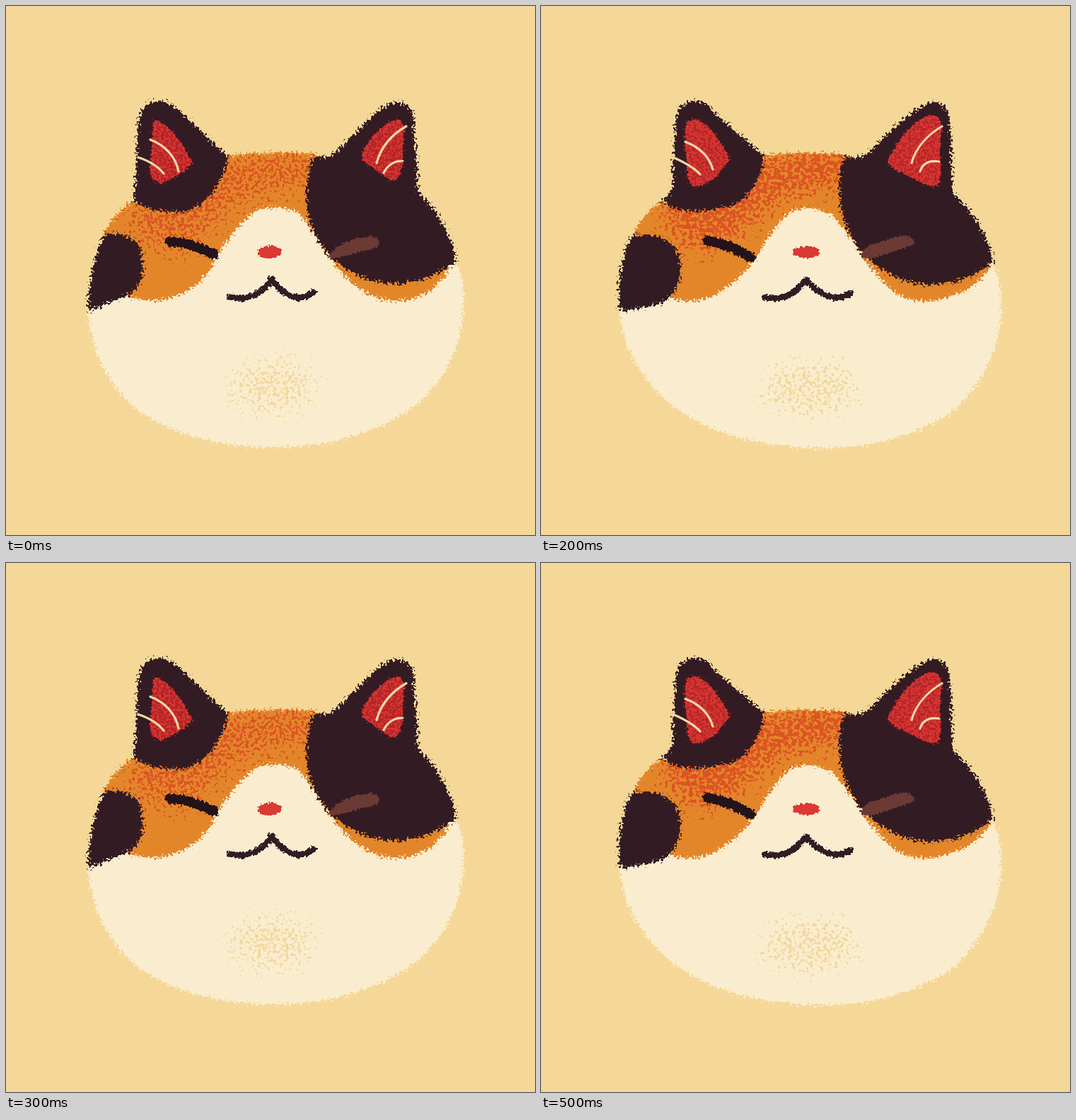
An HTML page without scripts that plays this animation: 748 by 748 pixels, repeating every 0.6 s.

```html
<!DOCTYPE html>
<html lang="en">
<head>
<meta charset="utf-8">
<title>Sleepy calico</title>
<style>
html, body { margin: 0; width: 100%; height: 100%; overflow: hidden; background: #f5d897; }
svg { position: absolute; left: 0; top: 0; width: 100%; height: 100%; }
.pose { opacity: 0; will-change: opacity; animation: show 300ms step-end infinite; }
.b { animation-delay: -200ms; }
.c { animation-delay: -100ms; }
@keyframes show { 0% { opacity: 1; } 33.333% { opacity: 0; } 100% { opacity: 0; } }

.cream { fill: #faedcf; }
.cap { fill: #e3862a; }
.rust { fill: #dc5424; }
.dark { fill: #331b24; }
.ears { fill: #d83530; }
.ears-grain { fill: #b0262a; }
.belly { fill: #f3d79f; fill-opacity: .46; }
.hair { fill: none; stroke: #f6d7a3; stroke-width: 3.2; stroke-linecap: round; }
.eye { fill: none; stroke: #24131a; stroke-width: 14; stroke-linecap: round; }
.lid { fill: #6b3a35; }
.nose { fill: #d93a33; }
.mouth { fill: none; stroke: #331b24; stroke-width: 8.5; stroke-linecap: round; stroke-linejoin: round; }

.a .edge { filter: url(#edgeA); } .a .line { filter: url(#lineA); } .a .grain { filter: url(#grainA); }
.b .edge { filter: url(#edgeB); } .b .line { filter: url(#lineB); } .b .grain { filter: url(#grainB); }
.c .edge { filter: url(#edgeC); } .c .line { filter: url(#lineC); } .c .grain { filter: url(#grainC); }
</style>
</head>
<body>

<!-- Each filter blurs a shape, adds noise and thresholds it, giving a dry-brush edge or speckle. -->
<svg viewBox="0 0 748 748" aria-hidden="true">
  <defs>
    <filter id="edgeA" color-interpolation-filters="sRGB">
      <feTurbulence type="fractalNoise" baseFrequency=".3" numOctaves="2" seed="3"/>
      <feColorMatrix values="0 0 0 0 0 0 0 0 0 0 0 0 0 0 0 0 0 0 2.4 -.7" result="noise"/>
      <feGaussianBlur in="SourceGraphic" stdDeviation="2.8" result="soft"/>
      <feComposite in="noise" in2="soft" operator="arithmetic" k2=".5" k3=".55"/>
      <feColorMatrix values="1 0 0 0 0 0 1 0 0 0 0 0 1 0 0 0 0 0 24 -12" result="mask"/>
      <feColorMatrix in="soft" values="1 0 0 0 0 0 1 0 0 0 0 0 1 0 0 0 0 0 99 0"/>
      <feComposite in2="mask" operator="in"/>
    </filter>
    <filter id="edgeB" color-interpolation-filters="sRGB">
      <feTurbulence type="fractalNoise" baseFrequency=".3" numOctaves="2" seed="14"/>
      <feColorMatrix values="0 0 0 0 0 0 0 0 0 0 0 0 0 0 0 0 0 0 2.4 -.7" result="noise"/>
      <feGaussianBlur in="SourceGraphic" stdDeviation="2.8" result="soft"/>
      <feComposite in="noise" in2="soft" operator="arithmetic" k2=".5" k3=".55"/>
      <feColorMatrix values="1 0 0 0 0 0 1 0 0 0 0 0 1 0 0 0 0 0 24 -12" result="mask"/>
      <feColorMatrix in="soft" values="1 0 0 0 0 0 1 0 0 0 0 0 1 0 0 0 0 0 99 0"/>
      <feComposite in2="mask" operator="in"/>
    </filter>
    <filter id="edgeC" color-interpolation-filters="sRGB">
      <feTurbulence type="fractalNoise" baseFrequency=".3" numOctaves="2" seed="27"/>
      <feColorMatrix values="0 0 0 0 0 0 0 0 0 0 0 0 0 0 0 0 0 0 2.4 -.7" result="noise"/>
      <feGaussianBlur in="SourceGraphic" stdDeviation="2.8" result="soft"/>
      <feComposite in="noise" in2="soft" operator="arithmetic" k2=".5" k3=".55"/>
      <feColorMatrix values="1 0 0 0 0 0 1 0 0 0 0 0 1 0 0 0 0 0 24 -12" result="mask"/>
      <feColorMatrix in="soft" values="1 0 0 0 0 0 1 0 0 0 0 0 1 0 0 0 0 0 99 0"/>
      <feComposite in2="mask" operator="in"/>
    </filter>

    <filter id="lineA" color-interpolation-filters="sRGB" y="-20%" height="140%">
      <feTurbulence type="fractalNoise" baseFrequency=".3" numOctaves="2" seed="5"/>
      <feColorMatrix values="0 0 0 0 0 0 0 0 0 0 0 0 0 0 0 0 0 0 2.4 -.7" result="noise"/>
      <feGaussianBlur in="SourceGraphic" stdDeviation="1.2" result="soft"/>
      <feComposite in="noise" in2="soft" operator="arithmetic" k2=".5" k3=".55"/>
      <feColorMatrix values="1 0 0 0 0 0 1 0 0 0 0 0 1 0 0 0 0 0 24 -12" result="mask"/>
      <feColorMatrix in="soft" values="1 0 0 0 0 0 1 0 0 0 0 0 1 0 0 0 0 0 99 0"/>
      <feComposite in2="mask" operator="in"/>
    </filter>
    <filter id="lineB" color-interpolation-filters="sRGB" y="-20%" height="140%">
      <feTurbulence type="fractalNoise" baseFrequency=".3" numOctaves="2" seed="16"/>
      <feColorMatrix values="0 0 0 0 0 0 0 0 0 0 0 0 0 0 0 0 0 0 2.4 -.7" result="noise"/>
      <feGaussianBlur in="SourceGraphic" stdDeviation="1.2" result="soft"/>
      <feComposite in="noise" in2="soft" operator="arithmetic" k2=".5" k3=".55"/>
      <feColorMatrix values="1 0 0 0 0 0 1 0 0 0 0 0 1 0 0 0 0 0 24 -12" result="mask"/>
      <feColorMatrix in="soft" values="1 0 0 0 0 0 1 0 0 0 0 0 1 0 0 0 0 0 99 0"/>
      <feComposite in2="mask" operator="in"/>
    </filter>
    <filter id="lineC" color-interpolation-filters="sRGB" y="-20%" height="140%">
      <feTurbulence type="fractalNoise" baseFrequency=".3" numOctaves="2" seed="29"/>
      <feColorMatrix values="0 0 0 0 0 0 0 0 0 0 0 0 0 0 0 0 0 0 2.4 -.7" result="noise"/>
      <feGaussianBlur in="SourceGraphic" stdDeviation="1.2" result="soft"/>
      <feComposite in="noise" in2="soft" operator="arithmetic" k2=".5" k3=".55"/>
      <feColorMatrix values="1 0 0 0 0 0 1 0 0 0 0 0 1 0 0 0 0 0 24 -12" result="mask"/>
      <feColorMatrix in="soft" values="1 0 0 0 0 0 1 0 0 0 0 0 1 0 0 0 0 0 99 0"/>
      <feComposite in2="mask" operator="in"/>
    </filter>

    <filter id="grainA" color-interpolation-filters="sRGB" x="-30%" y="-50%" width="160%" height="200%">
      <feTurbulence type="fractalNoise" baseFrequency=".23" numOctaves="2" seed="8"/>
      <feColorMatrix values="0 0 0 0 0 0 0 0 0 0 0 0 0 0 0 0 0 0 2.4 -.7" result="noise"/>
      <feGaussianBlur in="SourceGraphic" stdDeviation="15" result="soft"/>
      <feComposite in="noise" in2="soft" operator="arithmetic" k2=".5" k3=".55"/>
      <feColorMatrix values="1 0 0 0 0 0 1 0 0 0 0 0 1 0 0 0 0 0 24 -12" result="mask"/>
      <feColorMatrix in="soft" values="1 0 0 0 0 0 1 0 0 0 0 0 1 0 0 0 0 0 99 0"/>
      <feComposite in2="mask" operator="in"/>
    </filter>
    <filter id="grainB" color-interpolation-filters="sRGB" x="-30%" y="-50%" width="160%" height="200%">
      <feTurbulence type="fractalNoise" baseFrequency=".2" numOctaves="2" seed="19"/>
      <feColorMatrix values="0 0 0 0 0 0 0 0 0 0 0 0 0 0 0 0 0 0 2.4 -.7" result="noise"/>
      <feGaussianBlur in="SourceGraphic" stdDeviation="15" result="soft"/>
      <feComposite in="noise" in2="soft" operator="arithmetic" k2=".5" k3=".55"/>
      <feColorMatrix values="1 0 0 0 0 0 1 0 0 0 0 0 1 0 0 0 0 0 24 -12" result="mask"/>
      <feColorMatrix in="soft" values="1 0 0 0 0 0 1 0 0 0 0 0 1 0 0 0 0 0 99 0"/>
      <feComposite in2="mask" operator="in"/>
    </filter>
    <filter id="grainC" color-interpolation-filters="sRGB" x="-30%" y="-50%" width="160%" height="200%">
      <feTurbulence type="fractalNoise" baseFrequency=".2" numOctaves="2" seed="33"/>
      <feColorMatrix values="0 0 0 0 0 0 0 0 0 0 0 0 0 0 0 0 0 0 2.4 -.7" result="noise"/>
      <feGaussianBlur in="SourceGraphic" stdDeviation="15" result="soft"/>
      <feComposite in="noise" in2="soft" operator="arithmetic" k2=".5" k3=".55"/>
      <feColorMatrix values="1 0 0 0 0 0 1 0 0 0 0 0 1 0 0 0 0 0 24 -12" result="mask"/>
      <feColorMatrix in="soft" values="1 0 0 0 0 0 1 0 0 0 0 0 1 0 0 0 0 0 99 0"/>
      <feComposite in2="mask" operator="in"/>
    </filter>

    <path id="shade" d="M165 295L240 225L440 195V255C400 262 350 260 320 290L250 350L190 335Z"/>

    <path id="capA" d="M136 326C146 305 158 291 176 278L300 214C345 206 400 206 440 210L560 260L628 368C614 398 590 414 556 417C515 420 480 388 458 356C440 334 428 306 412 292C400 284 380 284 366 286C344 290 326 315 300 350C288 382 262 404 236 412C215 419 190 417 168 410Z"/>
    <path id="capB" d="M142 322C150 305 162 290 172 279L300 218C345 205 390 206 425 210L560 260L634 372C610 395 580 412 540 415C520 416 505 408 495 398C480 380 470 372 458 354C435 325 425 300 400 291C385 285 368 285 356 292C335 310 320 330 305 350C290 372 270 395 240 410C218 418 195 420 165 420Z"/>
    <path id="capC" d="M128 330C140 300 155 285 174 275L300 214C345 206 400 206 430 211L560 260L638 365C620 395 590 412 550 417C515 420 495 405 480 385C460 365 440 330 415 298C395 284 375 284 360 288C340 298 325 320 308 350C290 378 265 400 240 411C215 420 195 417 180 412Z"/>
    <clipPath id="clipA"><use href="#capA"/></clipPath>
    <clipPath id="clipB"><use href="#capB"/></clipPath>
    <clipPath id="clipC"><use href="#capC"/></clipPath>

    <path id="earsA" d="M210 161C232 167 245 190 264 221C253 236 235 243 219 251C209 248 203 240 204 228C207 205 206 180 210 161ZM503 207C515 190 532 165 552 161C565 160 563 180 561 200C560 220 562 240 550 247C540 247 525 230 512 224C505 218 502 212 503 207Z"/>
    <path id="earsB" d="M210 160C230 163 245 190 262 218C255 238 240 250 216 252C203 250 202 235 204 220C206 195 202 175 210 160ZM498 213C510 190 530 168 550 159C565 158 562 180 561 200C562 220 564 240 554 245C535 246 515 225 498 213Z"/>
    <path id="earsC" d="M207 163C220 156 235 167 244 180C254 195 262 205 266 217C252 238 240 252 217 255C205 250 208 230 206 215C203 195 202 175 207 163ZM490 218C505 190 525 163 548 155C566 152 567 165 565 185C562 210 568 240 562 252C550 260 530 245 515 238C503 233 495 228 490 218Z"/>
  </defs>
</svg>

<svg class="pose a" viewBox="0 0 748 748">
  <path class="cream edge" d="M116 428C118 480 140 530 180 566C235 610 315 625 385 624C460 624 540 600 590 555C630 515 645 470 647 425C648 400 645 382 638 366L600 320C560 260 500 222 440 217L320 219C240 230 170 300 150 335Z"/>
  <use class="cap edge" href="#capA"/>
  <g clip-path="url(#clipA)"><use class="rust grain" href="#shade" fill-opacity=".48"/></g>
  <g class="dark edge">
    <path d="M180 276C187 240 182 190 189 156C194 134 212 131 228 136C255 150 285 190 314 213C309 245 288 280 255 290C225 294 198 287 180 276Z"/>
    <path d="M140 322C165 320 188 326 192 350C198 378 190 402 168 411C150 416 135 425 116 432C116 395 124 350 140 322Z"/>
    <path d="M435 212C450 215 458 213 465 208C490 185 515 155 540 139C560 131 578 142 577 165C578 200 584 235 582 262C605 283 630 320 637 360C615 378 585 391 552 393C515 393 480 375 462 357C440 335 428 310 425 280C424 255 427 232 435 212Z"/>
  </g>
  <use class="ears line" href="#earsA"/>
  <use class="ears-grain edge" href="#earsA" fill-opacity=".52"/>
  <path class="hair" d="M204 189C225 197 240 213 244 234M187 214C205 220 216 228 223 237M566 170C545 182 530 200 524 222M534 236C540 224 550 219 561 219"/>
  <g class="line">
    <path class="eye" d="M232 333C252 334 274 341 294 351"/>
    <path class="lid" d="M456 357C460 340 490 327 515 326C530 327 533 340 520 343C500 346 480 356 456 357Z"/>
    <ellipse class="nose" cx="372.5" cy="348" rx="17" ry="9" transform="rotate(-4 372 348)"/>
    <path class="mouth" d="M316 411C340 417 365 408 376 385C388 408 415 422 435 404"/>
  </g>
  <ellipse class="belly grain" cx="376" cy="537" rx="58" ry="34"/>
</svg>

<svg class="pose b" viewBox="0 0 748 748">
  <path class="cream edge" d="M118 430C118 480 140 530 175 558C235 600 310 618 385 619C470 620 530 600 565 575C620 530 643 475 647 425C648 405 646 388 640 374L600 320C560 260 500 222 440 217L320 219C240 230 170 300 150 335Z"/>
  <use class="cap edge" href="#capB"/>
  <g clip-path="url(#clipB)"><use class="rust grain" href="#shade" fill-opacity=".52"/></g>
  <g class="dark edge">
    <path d="M170 274C180 270 186 262 184 240C186 205 182 180 190 150C198 133 218 135 232 138C260 158 288 192 318 213C308 245 290 265 270 278C245 290 215 292 195 290C183 287 175 282 170 274Z"/>
    <path d="M147 317C172 318 182 335 188 350C202 378 198 405 168 427C150 429 135 429 117 432C114 400 120 350 147 317Z"/>
    <path d="M421 211C435 214 450 216 458 212C480 185 512 160 540 139C562 130 575 150 578 175C578 210 584 235 587 270C615 300 634 335 639 371C610 390 580 400 550 402C510 402 480 378 460 360C436 330 428 310 427 285C420 255 420 230 421 211Z"/>
  </g>
  <use class="ears line" href="#earsB"/>
  <use class="ears-grain edge" href="#earsB" fill-opacity=".42"/>
  <path class="hair" d="M204 188C225 196 238 212 241 231M187 212C205 220 217 228 223 237M565 171C545 182 528 200 522 225M534 232C542 220 550 217 560 218"/>
  <g class="line">
    <path class="eye" d="M233 335C255 337 275 343 298 352"/>
    <path class="lid" d="M455 358C458 342 475 334 510 327C524 325 534 334 528 340C510 346 490 350 470 357C463 360 458 360 455 358Z"/>
    <ellipse class="nose" cx="373" cy="348" rx="17.5" ry="8.5"/>
    <path class="mouth" d="M314 410C345 418 360 405 375 386C385 402 410 422 435 407"/>
  </g>
  <ellipse class="belly grain" cx="380" cy="536" rx="58" ry="34"/>
</svg>

<svg class="pose c" viewBox="0 0 748 748">
  <path class="cream edge" d="M111 430C115 480 140 525 180 560C235 605 310 623 385 625C470 626 535 605 580 575C630 530 650 480 651 420C650 400 647 382 640 367L600 320C560 260 500 222 440 217L320 219C240 230 170 300 150 335Z"/>
  <use class="cap edge" href="#capC"/>
  <g clip-path="url(#clipC)"><use class="rust grain" href="#shade" fill-opacity=".6"/></g>
  <g class="dark edge">
    <path d="M170 276C185 268 188 255 186 230C190 200 186 170 195 146C202 132 225 132 236 141C260 165 290 190 316 212C312 240 300 265 275 280C250 289 215 292 195 288C180 284 174 280 170 276Z"/>
    <path d="M130 324C160 320 190 330 196 355C202 385 190 410 170 420C145 428 130 428 111 432C108 395 112 350 130 324Z"/>
    <path d="M430 212C442 216 455 214 463 208C490 180 520 150 545 138C565 130 580 145 578 170C582 200 580 235 582 265C608 285 632 325 640 361C610 385 580 395 545 394C510 392 480 375 460 355C440 335 428 310 423 280C420 255 422 230 430 212Z"/>
  </g>
  <use class="ears line" href="#earsC"/>
  <use class="ears-grain edge" href="#earsC" fill-opacity=".46"/>
  <path class="hair" d="M204 192C225 200 238 214 243 231M187 214C205 222 217 229 225 238M567 170C547 182 530 200 524 222M536 234C540 222 550 218 563 220"/>
  <g class="line">
    <path class="eye" d="M235 332C255 334 280 345 296 355"/>
    <path class="lid" d="M453 353C455 340 465 338 485 332C505 324 525 322 528 333C526 342 500 345 475 355C462 358 454 358 453 353Z"/>
    <ellipse class="nose" cx="375" cy="348" rx="19" ry="8.5"/>
    <path class="mouth" d="M316 412C345 418 360 405 375 387C390 405 415 422 438 406"/>
  </g>
  <ellipse class="belly grain" cx="382" cy="540" rx="64" ry="35"/>
</svg>

</body>
</html>
```
